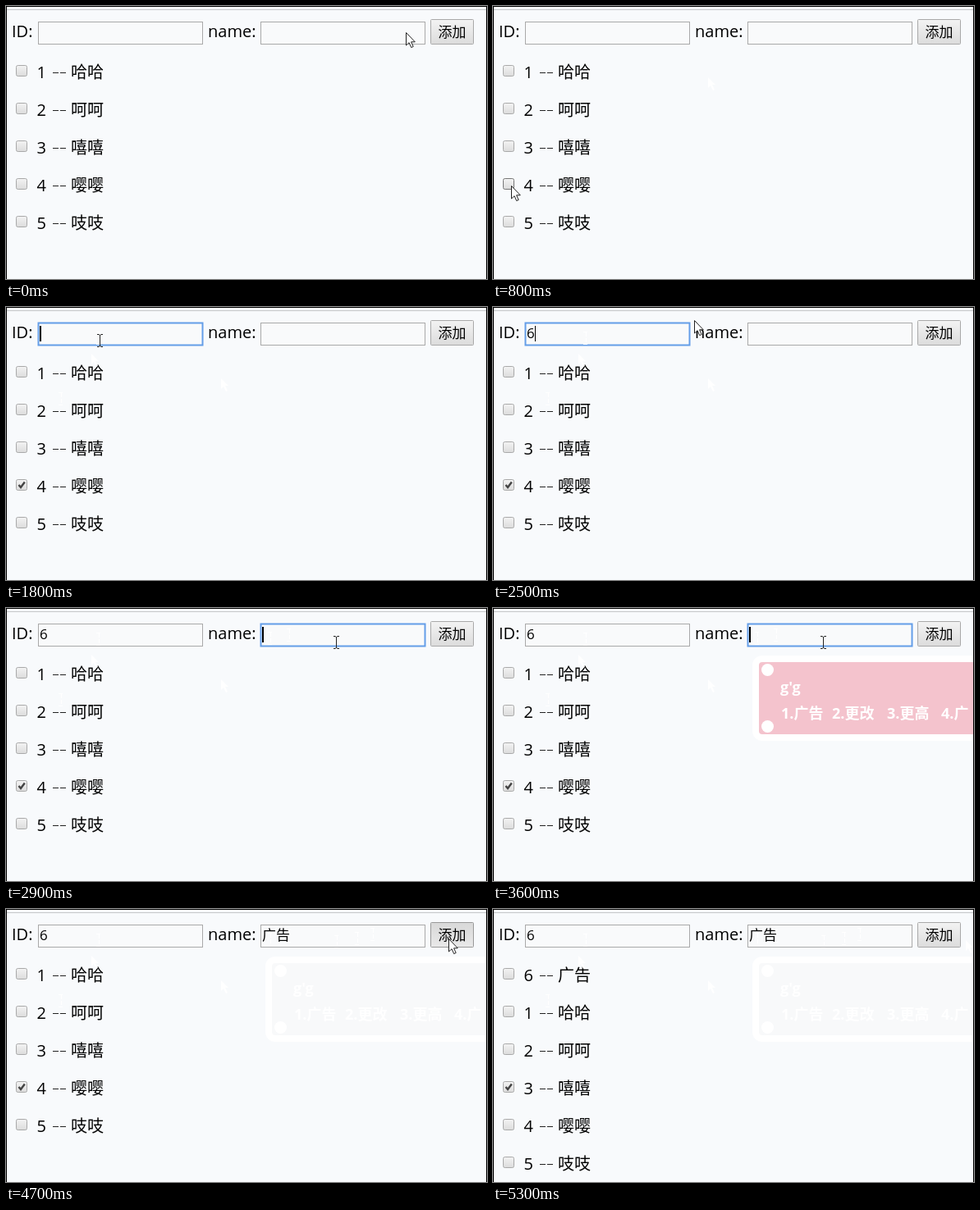
Write an HTML page that moves like this. It is 586x333 px and loops after 5800 ms.

```html
<!DOCTYPE html>
<html lang="zh">
<head>
<meta charset="utf-8">
<title>Add to list</title>
<style>
  html, body { margin: 0; width: 100%; height: 100%; overflow: hidden; background: #f8fafc; }
  svg { display: block; width: 586px; height: 333px; }
  text { font: 20px "Open Sans", "Noto Sans CJK SC", "Noto Sans CJK", sans-serif; white-space: pre; }
  .field { font-size: 17px; }
  .input { fill: #f9fafb; stroke: #a9a9a9; }
  .input.focus { stroke: #649ee8; stroke-width: 2; }
  .box { fill: url(#face); stroke: #a9a9a9; }
  .box.hover { stroke: #777; }
  #button { fill: url(#face); stroke: #a9a9a9; }
  #button.hover { fill: url(#lit); stroke: #999; }
  #button.press { fill: url(#down); stroke: #999; }
  #panel { fill: #f4c3cd; stroke: #fff; stroke-width: 8; }
  #ime.faded #panel { fill: #f8f9fa; }
  #ime text { fill: #fff; font-weight: 700; font-size: 18px; }
  #ime circle { fill: #fff; }
  .arrow { fill: #fff; stroke: #222; stroke-width: 1; }
  .beam { fill: none; stroke: #222; stroke-width: 1; }
  .trace .arrow { stroke: none; }
  .trace .beam { stroke: #fff; stroke-dasharray: 5 2; }
</style>
</head>
<body>
<svg viewBox="0 0 586 333">
  <defs>
    <linearGradient id="face" x2="0" y2="1"><stop stop-color="#f3f3f3"/><stop offset="1" stop-color="#dcdcdc"/></linearGradient>
    <linearGradient id="lit" x2="0" y2="1"><stop stop-color="#f8f8f8"/><stop offset="1" stop-color="#e2e2e2"/></linearGradient>
    <linearGradient id="down" x2="0" y2="1"><stop stop-color="#d8d8d8"/><stop offset="1" stop-color="#e9e9e9"/></linearGradient>
    <path id="arrow" class="arrow" d="M.5 .5V16L4.1 12.7 6.7 18.6 9.2 17.5 6.6 11.8H11.3Z"/>
    <path id="beam" class="beam" d="M-3 -7.5H-1L.5 -6.5 2 -7.5H4M.5 -6.5V6.5M-3 7.5H-1L.5 6.5 2 7.5H4"/>
  </defs>
  <path d="M0 4.5H586" stroke="#c4c6c8"/>

  <text x="7" y="38">ID:</text>
  <text x="246" y="38">name:</text>
  <rect id="idBox" class="input" x="39.5" y="19.5" width="200" height="27"/>
  <rect id="nameBox" class="input" x="310.5" y="19.5" width="200" height="27"/>
  <text id="idText" class="field" x="41" y="38"></text>
  <text id="nameText" class="field" x="312" y="38"></text>
  <rect id="button" x="517.5" y="16.5" width="52" height="30" rx="1"/>
  <text id="buttonText" class="field" x="526.5" y="38">添加</text>
  <g id="rows"></g>
  <g id="traces"></g>
  <g id="ime">
    <rect id="panel" x="320" y="62" width="300" height="96" rx="8"/>
    <circle cx="334.5" cy="75.5" r="7.5"/>
    <circle cx="334.5" cy="144.5" r="7.5"/>
    <text id="pinyin" x="350" y="103"></text>
    <text x="351" y="135">1.广告</text>
    <text x="413" y="135">2.更改</text>
    <text x="480" y="135">3.更高</text>
    <text x="546" y="135">4.广</text>
  </g>
  <rect id="caret" y="23" height="19"/>
  <use id="pointer"/>
  <path d="M0 .5H586M.5 0V333M585.5 0V333" stroke="#000" fill="none"/>
</svg>
<script>
const LOOP = 5800;
const $ = id => document.getElementById(id);
const show = (el, on) => el.setAttribute('visibility', on ? 'visible' : 'hidden');

// Each timeline holds its value until the next entry.
const at = (line, t) => line.findLast(step => step[0] <= t);
const within = (t, a, b) => t >= a && t < b;

const pointerLine = [
  [0, 487, 32, 'arrow'], [100, 456, 40, 'arrow'], [200, 380, 58, 'arrow'],
  [300, 261, 85, 'arrow'], [400, 110, 180, 'arrow'], [500, 1, 249, 'arrow'],
  [600, 13, 228, 'arrow'], [700, 18, 222, 'arrow'], [800, 22, 219, 'arrow'],
  [1100, 67, 112, 'beam'], [1200, 87, 78, 'beam'], [1400, 103, 55, 'arrow'],
  [1500, 113, 38, 'beam'], [1600, 114, 41, 'beam'],
  [2400, 150, 38, 'beam'], [2500, 245, 16, 'arrow'], [2600, 322, 37, 'beam'],
  [2700, 345, 33, 'beam'], [2800, 402, 42, 'beam'],
  [4000, 403, 40, 'beam'], [4100, 428, 36, 'beam'], [4200, 447, 31, 'beam'],
  [4300, 513, 30, 'arrow'], [4400, 538, 38, 'arrow'], [4500, 539, 36, 'arrow'],
  [5100, 558, 33, 'arrow'], [5200, 575, 36, 'arrow'], [5300, 600, 36, 'arrow']
];
// Pointer stops that leave a faint white mark behind.
const marked = [300, 1100, 1400, 1500, 2600, 2700, 4000, 4100, 4200, 5200];

const caretLine = [
  [0, 0], [1600, 41, 2], [2300, 51, 1], [2800, 0], [2900, 312, 2],
  [3400, 0], [3500, 312, 2], [3900, 345, 1], [4400, 0]
];

const names = ['哈哈', '呵呵', '嘻嘻', '嘤嘤', '吱吱'];
const before = names.map((name, i) => [i + 1, name]);
const after = [[6, '广告'], ...before];

$('rows').innerHTML = after.map((_, i) => `
  <g transform="translate(0 ${i * 46})">
    <rect class="box" x="12.5" y="72.5" width="13" height="13" rx="2"/>
    ${i === 3 ? '<path id="tick" d="M15.5 79L18 82 22.8 75.5" fill="none" stroke="#444" stroke-width="2.4"/>' : ''}
    <text class="num" x="37.5" y="88"></text>
    <path d="M57 81.5H64M66 81.5H73" stroke="#222"/>
    <text class="name" x="79" y="88"></text>
  </g>`).join('');
const rows = [...$('rows').children];

const place = (x, y, kind) => `href="#${kind}" transform="translate(${x} ${y})"`;
$('traces').innerHTML = marked.map(t => {
  const [, x, y, kind] = at(pointerLine, t);
  const d = kind === 'arrow'
    ? '<path class="arrow" d="M1 2V15L4 12 7 18 9 17 6 11H10Z"/>'
    : '<path class="beam" d="M-3 -7.5H4M.5 -7V7M-3 7.5H4"/>';
  return `<g class="trace" transform="translate(${x} ${y})">${d}</g>`;
}).join('');
const traces = [...$('traces').children];
const traceStart = marked.map(t => pointerLine.find(step => step[0] > t)[0]);

function drawPointer(t) {
  const [, x, y, kind] = at(pointerLine, t);
  $('pointer').setAttribute('href', '#' + kind);
  $('pointer').setAttribute('transform', `translate(${x} ${y})`);
  traces.forEach((el, i) => show(el, t >= traceStart[i]));
}

function drawForm(t) {
  $('idBox').classList.toggle('focus', within(t, 1600, 2900));
  $('nameBox').classList.toggle('focus', within(t, 2900, 4600));
  $('idText').textContent = t >= 2300 ? '6' : '';
  $('nameText').textContent = t >= 3900 ? '广告' : '';

  const [, x, width = 0] = at(caretLine, t);
  $('caret').setAttribute('x', x);
  $('caret').setAttribute('width', width);

  const pressed = within(t, 4600, 4800);
  $('button').classList.toggle('press', pressed);
  $('button').classList.toggle('hover', !pressed && within(t, 4400, 5200));
}

function drawRows(t) {
  const list = t >= 4800 ? after : before;
  rows.forEach((row, i) => {
    show(row, i < list.length);
    const [num, name] = list[i] || ['', ''];
    row.querySelector('.num').textContent = num;
    row.querySelector('.name').textContent = name;
  });
  rows[3].querySelector('.box').classList.toggle('hover', within(t, 700, 1100));
  $('tick').style.display = t >= 1000 ? '' : 'none';
}

function drawIme(t) {
  show($('ime'), t >= 3500);
  $('ime').classList.toggle('faded', t >= 3900);
  $('pinyin').textContent = t < 3600 ? 'g' : "g'g";
}

function frame() {
  const t = performance.now() % LOOP;
  drawForm(t);
  drawRows(t);
  drawIme(t);
  drawPointer(t);
  requestAnimationFrame(frame);
}
frame();
</script>
</body>
</html>
```
